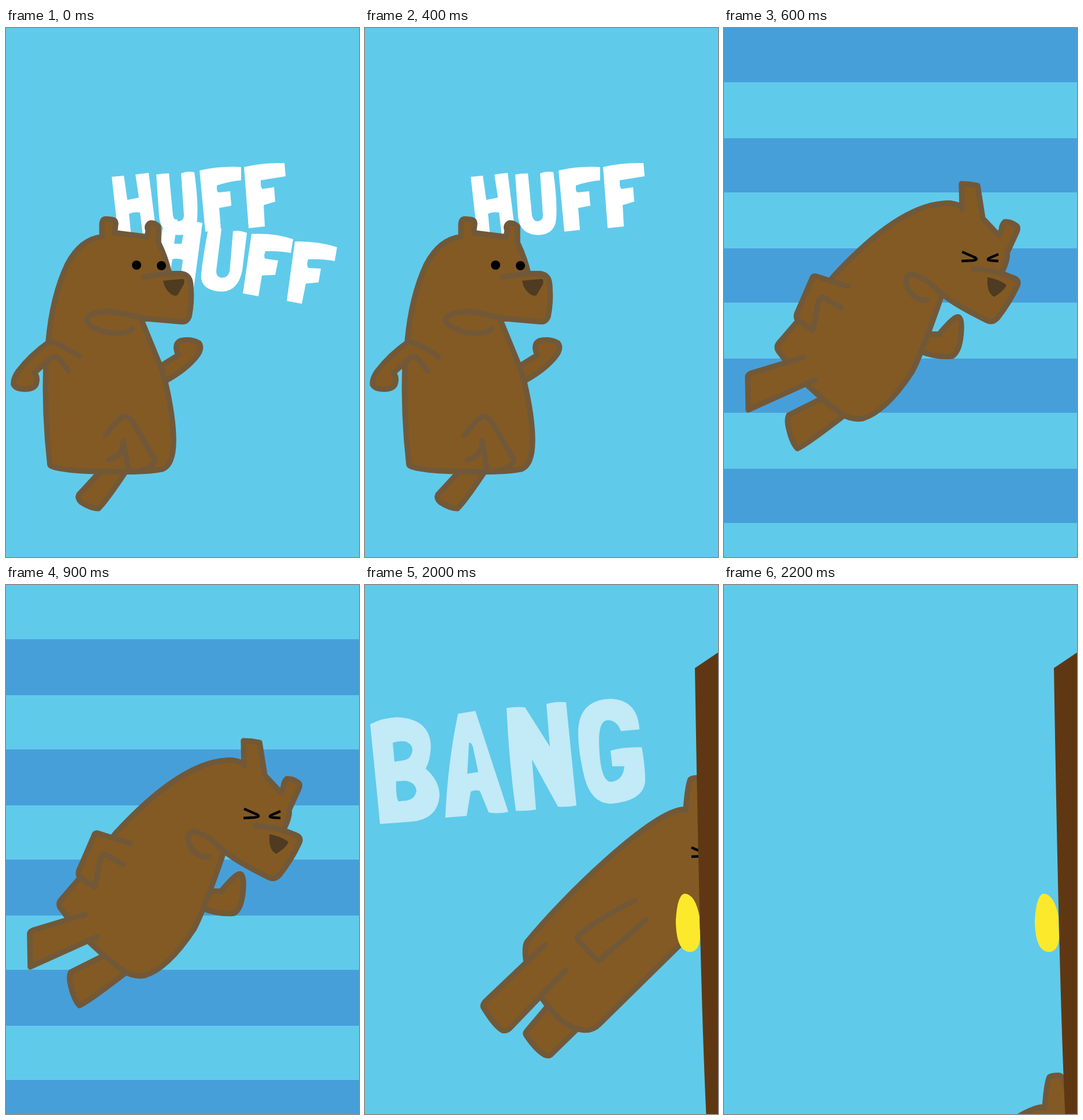
Recreate the animation shown at these times as an HTML page with a canvas. Size 611 by 917 pixels, loop 2.3 s.

```html
<!DOCTYPE html>
<html lang="en">
<head>
<meta charset="utf-8">
<title>Running bear</title>
<style>
html, body { margin: 0; width: 100%; height: 100%; overflow: hidden; background: #60caeb; }
canvas { display: block; }
</style>
</head>
<body>
<canvas id="stage" width="611" height="917"></canvas>
<script>
const W = 611, H = 917, LOOP = 2300;
const SKY = '#60caeb', STRIPE = '#479fd9', FUR = '#835a24', EDGE = '#715838',
      NOSE = '#4e3b22', DOOR = '#5f3813', KNOB = '#fde92b';
const ctx = document.getElementById('stage').getContext('2d');

const shape = (...parts) => new Path2D(parts.join(' '));

const huff = shape(
  'M183 258L204 256L210 298L230 294L224 254L247 251L262 370L238 370L232 320Q222 318 213 322L217 365L195 365Z',
  'M260 254Q270 252 282 252L289 325Q291 335 299 335Q308 334 308 325L303 252Q315 247 326 250Q333 300 331 330Q329 358 300 359Q268 358 265 327Z',
  'M335 247Q370 239 407 241L407 264Q385 266 365 273Q364 284 368 285L388 283L390 308L369 312L372 350L345 353Z',
  'M412 241Q445 233 482 234L484 257L441 264Q440 276 444 279L464 276L466 301L446 307L448 344L420 347Z');

const huffLow = shape(
  'M274 330L297 332L291 374L304 374L311 335L317 333L340 338L325 450L300 450L306 402Q296 398 288 401L280 450L255 450Z',
  'M350 348Q362 344 373 348L364 420Q363 432 374 433Q384 433 387 422L393 352Q405 350 417 355L409 420Q402 456 374 457Q342 456 338 435Q336 425 350 348Z',
  'M425 357Q465 355 497 366L493 390Q470 386 449 387Q445 397 449 400L471 403L466 428L443 429L437 465L410 460Z',
  'M500 370Q540 369 573 380L569 404Q545 400 523 401Q519 412 524 416L545 417L541 441L519 443L512 478L486 473Z');

const bang = shape(
  'M9 142Q30 131 55 130Q112 132 114 180Q113 205 105 219Q129 240 129 266Q126 307 80 311L26 315Z',
  'M48 174Q60 170 70 172Q83 177 82 188Q80 203 65 205L51 207Z',
  'M54 241L70 240Q88 243 89 258Q86 275 65 275L58 276Q53 268 54 241Z',
  'M161 124L191 119L248 294Q232 298 214 295L199 258Q190 255 183 259L176 301L139 304Q143 210 161 124Z',
  'M180 174Q184 173 187 182L196 225L177 228Z',
  'M245 114Q262 111 277 113L320 181L314 107Q330 102 348 104L366 283Q350 286 334 285L289 203L296 290Q280 293 261 292Q249 205 245 114Z',
  'M475 151L443 154Q436 135 420 135Q405 136 405 170Q406 240 425 242Q447 240 449 215L428 215L425 188Q445 181 479 182Q485 215 485 240Q483 275 425 280Q392 279 380 235Q369 190 369 155Q370 100 425 98Q472 100 475 151Z');

const run = {
  body: shape('M73 545Q80 465 106 410Q129 366 166 362L166 342Q166 331 173 331L183 332Q190 333 190 339L188 355L244 362L246 351Q242 342 250 338Q258 337 264 344L264 372Q277 399 283 426L304 426Q320 428 320 450Q322 475 317 500Q313 511 302 509L245 504L234 505',
    'L268 588L276 614Q290 675 290 715Q290 758 270 765Q250 769 225 769Q150 770 110 766Q77 762 76 757Q66 670 69 580Z'),
  lines: shape('M238 432Q280 424 304 426M245 504L180 491Q140 493 139 507Q145 520 175 528Q210 532 219 521'),
  nose: shape('M272 438L306 435Q310 436 308 444L297 463Q292 466 285 461Q274 452 272 438Z')
};

const strideA = {
  back: [
    shape('M258 592L298 567Q290 548 302 542Q320 538 334 546Q342 557 325 575Q305 597 270 615'),
    shape('M160 772L126 809Q123 815 130 822Q147 833 160 833Q172 822 208 768')],
  front: [
    shape('M127 570Q100 550 76 543Q42 567 21 595Q12 608 13 618Q18 627 35 626Q52 625 53 613Q55 604 49 598L78 572Q86 566 95 577L108 594'),
    shape('M172 706Q195 674 207 673Q216 675 225 693L256 745Q260 752 250 760Q235 770 212 769L203 716Q201 745 177 748')]
};

const strideB = {
  back: [
    shape('M225 760L262 820Q268 826 278 820L300 805Q304 798 296 790L270 755')],
  front: [
    shape('M112 560Q135 605 165 612Q195 600 215 580Q228 565 215 556Q200 550 190 565L168 580Q150 575 140 555'),
    shape('M150 735L110 800Q106 808 115 815Q130 825 143 826Q155 815 205 735')]
};

const leap = {
  back: [
    shape('M345 530L372 531Q395 503 403 501Q411 498 411 520Q410 560 395 569Q370 572 338 560'),
    shape('M172 641L112 671Q108 680 112 695Q118 720 127 729Q140 724 210 670')],
  body: shape('M130 505L94 547Q90 553 94 560L107 577L143 618Q185 657 205 670Q222 680 240 677Q280 665 325 597Q340 570 377 463L380 463Q400 480 455 507Q465 512 473 503Q495 475 508 446Q511 438 503 434L480 425',
    'Q492 402 490 390L506 355Q511 345 505 342Q496 335 486 336Q481 340 480 350L476 360L448 330L439 273Q425 270 411 270L412 314L410 309Q395 302 380 304Q300 310 190 430Z'),
  front: [
    shape('M215 448L158 430Q153 430 152 435L126 495Q124 502 127 505L153 524Q157 510 162 480Q165 466 172 467L203 485'),
    shape('M137 571L48 598Q40 601 41 607L42 662L157 610')],
  lines: shape('M378 463Q350 432 325 427Q314 428 315 440Q318 460 335 469Q345 473 351 471M432 417Q460 420 482 426'),
  nose: shape('M456 432Q480 437 489 446Q485 455 468 466Q454 460 456 432Z'),
  eyes: shape('M412 388L435 398Q441 402 430 403L411 404M475 392L459 399Q454 402 461 403L475 404')
};

const crash = {
  back: [
    shape('M317 635L280 679Q276 683 280 688Q297 713 312 721Q319 724 324 718L366 677')],
  body: shape('M279 560Q275 535 280 525C345 445 495 300 550 295L555 297Q558 255 563 243Q566 240 580 240Q586 241 588 250L605 300L605 471L405 668Q393 680 375 677Q340 672 306 622Z'),
  front: [
    shape('M311 530L208 628Q202 635 206 640Q225 671 238 678Q244 680 250 675L348 573')],
  lines: shape('M467 453Q420 475 369 513Q365 517 369 522L404 558L487 486'),
  eyes: shape('M565 361L588 371Q594 375 583 376L565 377')
};

const door = shape('M571 144L611 117V917H590.5Q580 700 571 144Z');
const knob = shape('M554 535Q572 537 579 575L580 612Q578 636 562 636Q538 635 538 580Q541 535 554 535Z');

function paint(path, color) {
  ctx.fillStyle = color;
  ctx.fill(path, 'evenodd');
}

function outline(path, color = EDGE, width = 9.4, cap = 'round') {
  ctx.strokeStyle = color;
  ctx.lineWidth = width;
  ctx.lineCap = cap;
  ctx.lineJoin = 'round';
  ctx.stroke(path);
}

function furry(path) {
  paint(path, FUR);
  outline(path);
}

function bear({ back, body, front, lines, nose, eyes }) {
  back.forEach(furry);
  furry(body);
  front.forEach(furry);
  outline(lines);
  if (nose) paint(nose, NOSE);
  if (eyes) outline(eyes, '#000', 4.5, 'butt');
}

function dot(x, y, r) {
  ctx.fillStyle = '#000';
  ctx.beginPath();
  ctx.arc(x, y, r, 0, 2 * Math.PI);
  ctx.fill();
}

function runScene(step) {
  const odd = step % 2 === 1;
  paint(huff, '#fff');
  if (odd || step === 0) paint(huffLow, '#fff');
  bear({ ...run, ...(odd ? strideB : strideA) });
  dot(226, 411, 8);
  dot(269, 412, 8);
}

function leapScene(step) {
  ctx.fillStyle = STRIPE;
  for (let y = step % 2 ? 94 : 0; y < H; y += 191) ctx.fillRect(0, y, W, step % 2 ? 97 : 94);
  bear(leap);
}

// The bear slides down the door while the word sinks and fades.
function crashScene(slide) {
  const fall = [0, 94, 305, 610][slide];
  ctx.save();
  ctx.translate(0, slide * 99.3);
  ctx.globalAlpha = [1, 0.615, 0.22, 0][slide];
  paint(bang, '#fff');
  ctx.restore();
  ctx.save();
  ctx.translate(0, fall);
  bear(crash);
  ctx.restore();
  paint(knob, KNOB);
  paint(door, DOOR);
}

function draw(t) {
  const step = Math.floor(t / 100);
  ctx.fillStyle = SKY;
  ctx.fillRect(0, 0, W, H);
  if (step < 6) runScene(step);
  else if (step < 10) leapScene(step);
  else crashScene(Math.max(0, step - 19));
}

const start = performance.now();
function tick() {
  draw((performance.now() - start) % LOOP);
  requestAnimationFrame(tick);
}
tick();
</script>
</body>
</html>
```
